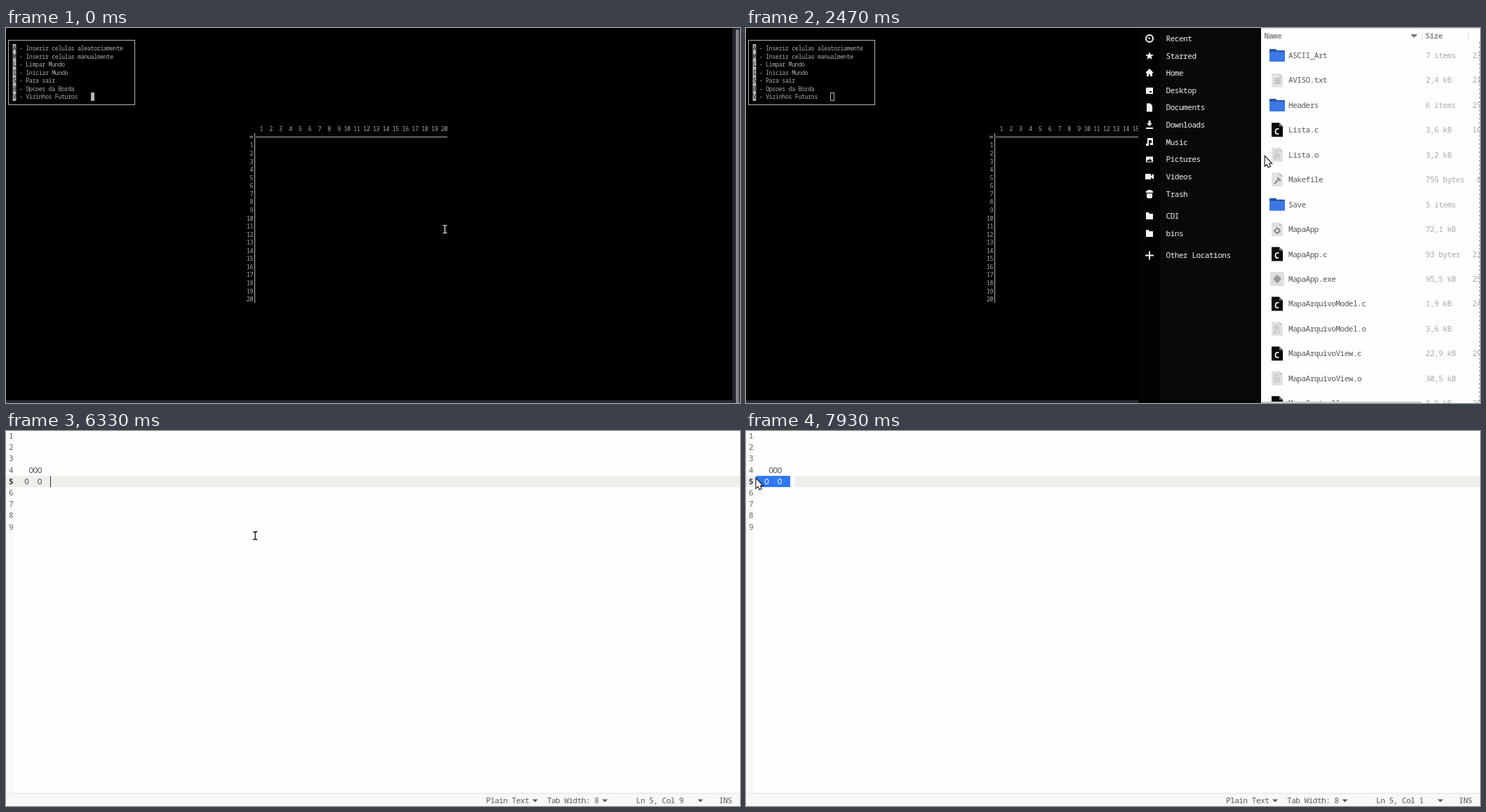
An HTML page with a canvas for the animation above (8 s loop, 1046 by 535 pixels).

```html
<!DOCTYPE html>
<html lang="pt">
<head>
<meta charset="utf-8">
<style>
html, body { margin: 0; width: 100%; height: 100%; overflow: hidden; background: #000; }
canvas { display: block; }
</style>
</head>
<body>
<canvas id="stage" width="1046" height="535"></canvas>
<script>
const ctx = document.getElementById('stage').getContext('2d');
const MONO = '"Noto Sans Mono", "DejaVu Sans Mono", monospace';
const SANS = '"Noto Sans", "Open Sans", sans-serif';
const LOOP = 8000, CELL = 4.617, CHAR = 6.13;

const ramp = (t, a, b) => Math.min(1, Math.max(0, (t - a) / (b - a)));

function rect(x, y, w, h, color, radius = 0) {
  ctx.fillStyle = color;
  ctx.beginPath();
  ctx.roundRect(x, y, w, h, radius);
  ctx.fill();
}
function disc(x, y, r, color) {
  ctx.fillStyle = color;
  ctx.beginPath();
  ctx.arc(x, y, r, 0, 7);
  ctx.fill();
}
function shape(d, x, y, fill, stroke, width = 1) {
  const path = new Path2D(d);
  ctx.save();
  ctx.translate(x, y);
  if (stroke) {
    ctx.strokeStyle = stroke;
    ctx.lineWidth = width;
    ctx.stroke(path);
  }
  if (fill) {
    ctx.fillStyle = fill;
    ctx.fill(path, 'evenodd');
  }
  ctx.restore();
}
// Monospaced text, y is the middle of the capitals
function mono(str, x, y, color, { size = 11, pitch = CHAR, weight = 400, align = 'left' } = {}) {
  ctx.font = `${weight} ${size}px ${MONO}`;
  ctx.letterSpacing = `${pitch - size * 0.6}px`;
  ctx.textAlign = 'left';
  ctx.fillStyle = color;
  ctx.fillText(str, align === 'right' ? x - str.length * pitch : x, y + size * 0.36);
}
function sans(str, x, y, size, color, align = 'left') {
  ctx.font = `${size}px ${SANS}`;
  ctx.letterSpacing = '0px';
  ctx.textAlign = align;
  ctx.fillStyle = color;
  ctx.fillText(str, x, y + size * 0.36);
}

// ---- Terminal ----
const MENU = ['Inserir celulas aleatoriamente', 'Inserir celulas manualmente', 'Limpar Mundo',
  'Iniciar Mundo', 'Para sair', 'Opcoes da Borda', 'Vizinhos Futuros'];
const TERM = { size: 8.3, pitch: CELL };
const TERM_RIGHT = { ...TERM, align: 'right' };

function terminal(t) {
  const gray = '#adadad', row = 11.56;
  rect(0, 0, 1046, 535, '#000');
  rect(0, 531, 1046, 4, '#2a2831');
  rect(1035, 0, 11, 535, '#25252d');
  rect(1040, 2, 4.5, 540, '#85858a', 2);

  ctx.strokeStyle = '#b4b4b4';
  ctx.lineWidth = 1;
  ctx.strokeRect(3.5, 17.5, 180, 92);
  rect(9.6, 23, 4.8, 81, '#b4b4b4');
  MENU.forEach((label, i) => {
    const y = 29 + i * row;
    mono('AMLISBV'[i], 9.8, y, '#111', TERM);
    mono('- ' + label, 19, y, gray, TERM);
  });
  if (t < 200) rect(121, 92, 5, 12, '#b4b4b4');
  else if (t >= 500) ctx.strokeRect(120.5, 92.5, 5, 11);

  for (let n = 1; n <= 20; n++) {
    mono(`${n}`, 366 + (n - 1) * 13.85, 144.5, gray, TERM_RIGHT);
    mono(`${n}`, 352, 167.5 + (n - 1) * row, gray, TERM_RIGHT);
  }
  rect(356, 155, 273, 1, '#b4b4b4');
  rect(354, 150, 1, 242, '#b4b4b4');
  rect(347, 154, 5, 1, '#999');
  rect(347, 156, 5, 1, '#999');
}

// ---- File manager ----
const FOLDER = 'M-5-5H-1L0-3H5V5H-5Z';
const PLACES = [
  [15, 'Recent', 'M-6 0A6 6 0 1 1 6 0A6 6 0 1 1-6 0ZM-4 0A4 4 0 1 1 4 0A4 4 0 1 1-4 0ZM-3-2L1-1V1H0Z'],
  [40, 'Starred', 'M0-6L1.6-2H6L2.5 .8 3.8 5 0 2.5-3.8 5-2.5 .8-6-2H-1.6Z'],
  [64, 'Home', 'M-6 0L0-6 6 0H4V5H1V2H-1V5H-4V0Z'],
  [89, 'Desktop', 'M-5-4H5V5H-5ZM0 1H3V3H0Z'],
  [113.5, 'Documents', 'M-4-6H1L4-3V6H-4Z'],
  [138, 'Downloads', 'M-1.5-6H1.5V-2H4L0 2-4-2H-1.5ZM-5 4H5V6H-5Z'],
  [163, 'Music', 'M-3-6H5V4H1V1H3V-3H-1V5H-5V2H-3Z'],
  [187.5, 'Pictures', 'M-5-4H5V4H-5ZM-4 3H4L1-1-1 1-2 0Z'],
  [212, 'Videos', 'M-6-4H2V-1L6-4V4L2 1V4H-6Z'],
  [237, 'Trash', 'M-5-4L-2-6H2L5-4V-2H-5ZM-4-1H4V4Q4 6 2 6H-2Q-4 6-4 4Z'],
  [268, 'CDI', FOLDER],
  [293, 'bins', FOLDER],
  [324.5, 'Other Locations', 'M-1-6H1V-1H6V1H1V6H-1V1H-6V-1H-1Z'],
];
const parse = list => list.trim().split('\n').map(line => line.split('|'));
const PROJECT = parse(`
ASCII_Art|7 items|23
AVISO.txt|2,4 kB|21
Headers|6 items|25
Lista.c|3,6 kB|16
Lista.o|3,2 kB|
Makefile|755 bytes| 8
Save|5 items|
MapaApp|72,1 kB|
MapaApp.c|93 bytes|22
MapaApp.exe|95,5 kB|25
MapaArquivoModel.c|1,9 kB|24
MapaArquivoModel.o|3,6 kB|
MapaArquivoView.c|22,9 kB|29
MapaArquivoView.o|30,5 kB|
MapaController.c|8,9 kB|25`);
const SAVES = parse(`
PiaoFita.txt|73 bytes|29
Borboleta.txt|73 bytes|29
Bot.dat|600,1 kB|
Meus_Olhos.dat|600,1 kB|29
Teste.txt|73 bytes|30`);

function fileIcon(name, size, y) {
  const ext = name.split('.')[1], x = 757, page = 'M-8-10H3L8-5V10H-8Z', ink = '#aaa';
  if (size.endsWith('items')) {
    rect(746, y - 9, 10, 8, '#2655a8', 1);
    rect(746, y - 7, 22, 5, '#2655a8', 1);
    rect(746, y - 5, 22, 14, '#3c78e6', 1.5);
  } else if (ext === 'c') {
    shape(page, x, y, '#0a0a0a');
    shape('M3-5L8-5 3-10Z', x, y, '#777');
    mono('C', 753, y + 2, '#fff', { size: 12, weight: 700 });
  } else if (ext === 'exe') {
    rect(747, y - 10, 20, 20, '#dedede', 2);
    shape('M0-6L3-3 0 0-3-3ZM0 0L3 3 0 6-3 3ZM-3-3L0 0-3 3-6 0ZM3-3L6 0 3 3 0 0Z', x, y, '#999', '#dedede', 2);
  } else {
    shape(page, x, y, '#e2e2e1');
    shape('M3-10V-5H8Z', x, y, '#c4c4c4');
    if (ext === 'txt') shape('M-4-2H5M-4 1H5M-4 4H5', x, y, null, ink, 1.4);
    else if (ext) ['10', '101', '011'].forEach((bits, i) => mono(bits, 752, y - 4 + i * 4.5, '#999', { size: 4.5, pitch: 3.3 }));
    else if (name === 'Makefile') shape('M-4 6L3-1M0-3L5 2', x, y, null, '#888', 1.8);
    else shape('M-3 2A3 3 0 1 1 3 2A3 3 0 1 1-3 2ZM0-3V-1M0 5V7M-5 2H-3M3 2H5', x, y, null, '#888', 1.8);
  }
}

function files(t, mouse) {
  rect(559, 0, 31, 535, '#030303');
  rect(590, 0, 144, 535, '#090907');
  PLACES.forEach(([y, label, icon]) => {
    if (t >= 2170 && mouse.x < 730 && Math.abs(mouse.y - y) < 12.2) rect(559, y - 12, 175, 24, '#191917');
    shape(icon, 575, y, '#f4f4f4');
    mono(label, 598.6, y, '#f2f2f0');
  });
  rect(734, 0, 312, 535, '#fefefd');
  rect(734, 0, 312, 1, '#d8d8d8');
  mono('Name', 738.5, 11, '#84888a', { weight: 700 });
  mono('Size', 968, 11, '#84888a', { weight: 700 });
  shape('M-5-2H5L0 3Z', 952, 11, '#707578');
  rect(963, 4, 1, 14, '#ddd');
  rect(1029, 4, 1, 14, '#ddd');

  const inSaves = t >= 3090;
  const selected = inSaves ? (t >= 4640 ? 1 : -1) : (t >= 3000 ? 6 : -1);
  (inSaves ? SAVES : PROJECT).forEach(([name, size, date], i) => {
    const y = 39 + i * 35.45, on = i === selected;
    if (on) rect(734, y - 17.5, 312, 35, '#2f78f6');
    fileIcon(name, size, y);
    mono(name, 773, y, on ? '#fff' : '#51585c');
    mono(size, 968.5, y, on ? '#fff' : '#a8aaa9');
    mono(date, 1035, y, on ? '#fff' : '#a8aaa9');
  });
  ctx.setLineDash([3, 3]);
  shape('M0 20V535', 1045.5, 0, null, '#999');
  ctx.setLineDash([]);
  if (t >= 2170) rect(735, 533, 228, 2, '#c9c9c8');
}

// ---- Window switcher ----
function filesThumb(x, y, w, h, split) {
  rect(x, y, w, h, '#fbfbfb');
  rect(x, y, split, h, '#050505');
  rect(x, y, w, 5, '#111');
  for (let i = 0; i < 10; i++) {
    const rowY = y + 11 + i * 8;
    if (rowY > y + h - 3) break;
    rect(x + 4, rowY, 2, 2, '#aaa');
    rect(x + 8, rowY, 9, 1.2, '#777');
    rect(x + split + 3, rowY, 4, 3, i % 3 ? '#bbb' : '#3c78e6');
    rect(x + split + 9, rowY + 1, 12, 1, '#888');
    rect(x + w - 16, rowY + 1, 7, 1, '#ccc');
  }
}
function folderIcon(x, y) {
  rect(x + 3, y, 14, 8, '#3c78e6', 2);
  rect(x + 2, y + 3, 30, 14, '#4f86e8', 2);
  rect(x, y + 9, 34, 22, '#e9ecf2', 3);
  rect(x + 12, y + 15, 10, 3, '#aab4c4', 1);
}

function switcher(alpha) {
  if (alpha <= 0) return;
  ctx.save();
  ctx.globalAlpha = alpha;
  ctx.shadowColor = 'rgba(0,0,0,.5)';
  ctx.shadowBlur = 5;
  ctx.shadowOffsetY = 1;
  rect(100, 167, 842, 153, '#1b1f20', 1);
  ctx.shadowColor = 'transparent';
  rect(228, 177, 112, 112, '#e8727b', 3);

  rect(116, 206, 98, 53, '#040505');
  rect(116, 206, 98, 3, '#2c2f31');
  rect(118, 211, 17, 8, '#1d1d1d');
  rect(149, 221, 1, 24, '#242424');
  rect(149, 221, 26, 1, '#242424');
  rect(179, 249, 34, 28, '#eee', 4);
  rect(181, 251, 30, 24, '#171717', 3);

  filesThumb(244, 186, 79, 93, 29);
  folderIcon(298, 248);

  rect(353, 206, 99, 53, '#fdfdfd');
  rect(353, 206, 99, 3, '#191919');
  rect(357, 213, 4, 1, '#888');
  shape('M0 0H17L26 9V34H0Z', 420, 247, '#f0f0ee');
  shape('M17 0V9H26Z', 420, 247, '#cfcfcd');
  disc(443, 272, 8.5, '#cf1f2e');

  rect(472, 206, 98, 53, '#fbfbfb');
  rect(472, 206, 98, 5, '#dfe1e5');
  rect(476, 214, 30, 1, '#aaa');
  rect(535, 220, 8, 3, '#3a9b57');
  for (let i = 0; i < 6; i++) rect(486, 223 + i * 3.5, 46 - i % 3 * 8, 1, '#c2c6ca');
  sans('Resumo geral', 482, 245, 4, '#333');
  disc(551, 263, 16, '#e2453a');

  filesThumb(593, 195, 94, 75, 22);
  folderIcon(653, 248);

  rect(708, 206, 99, 53, '#ecebf0');
  rect(708, 206, 99, 4, '#4b4a8f');
  rect(708, 210, 6, 49, '#37366b');
  rect(714, 210, 22, 49, '#d9d8e4');
  for (let i = 0; i < 9; i++) {
    rect(717, 213 + i * 5, 15, 1.5, '#77759f');
    rect(742 + i % 2 * 14, 213 + i * 5, 40, 2.5, i % 4 ? '#fff' : '#c7a24c');
  }
  rect(773, 249, 32, 32, '#6264b8', 3);

  rect(828, 222, 98, 19, '#fafafa');
  rect(828, 222, 98, 3, '#181818');
  disc(923, 223.5, 1, '#e65050');
  disc(832, 230, 2, '#2a9d9d');
  sans('The computer needs to restart to finish installing updates.', 836, 230, 3.2, '#222');
  sans('Restart Later', 834, 238, 3, '#555');
  sans('Restart Now', 895, 238, 3, '#555');
  disc(907, 263, 16.5, '#e8efee');
  disc(907, 263, 14.5, '#249f9f');

  sans('Caderno de Mapa', 521, 304, 10.8, '#7c8283', 'center');
  ctx.restore();
}

// ---- Text editor ----
const LINES = ['', '', '', '   OOO', '  O  O', '', '', '', ''];
const lineTop = n => Math.round(16.2 * (n - 1) - 1);
const colX = c => 14 + (c - 1) * 6.125;

function caretAt(t) {
  if (t < 6970) return { line: 5, col: 9 };
  const p = pointer(t - 45);
  const clamp = (v, max) => Math.min(max, Math.max(1, v));
  return { line: clamp(Math.floor((p.y + 1) / 16.2) + 1, 5), col: clamp(Math.round((p.x - 14) / 6.125) + 1, 9) };
}

function editor(t) {
  const { line, col } = caretAt(t);
  const selecting = line < 5 || col < 9;
  rect(0, 0, 1046, 535, '#fefefd');
  rect(0, 0, 12, 517, '#f9f9f8');
  rect(0, lineTop(line), 1046, 16, '#eeeeea');
  if (selecting) {
    if (line < 5) rect(13, lineTop(line), 8, 16, '#fefefd');
    else rect(63, lineTop(5), 7, 16, '#fefefd');
    for (let n = line; n <= 5; n++) {
      const x = n === line ? colX(col) : 14;
      rect(x, lineTop(n), (n === 5 ? 63 : 1044) - x, lineTop(n + 1) - lineTop(n), '#2f78f8');
    }
  }
  LINES.forEach((str, i) => {
    const n = i + 1, y = lineTop(n) + 8.3;
    mono(`${n}`, 4, y, n === line ? '#333' : '#666', { weight: n === line ? 700 : 400 });
    mono(str, 14, y, selecting && n >= line ? '#fff' : '#4c4f50');
  });
  const blinkOn = t < 5530 || (t >= 5930 && t < 6730);
  if (!selecting && blinkOn) rect(63, 64, 1, 16, '#333');

  rect(0, 517, 1046, 18, '#f8f8f7');
  rect(0, 516.5, 1046, 1, '#e0e0de');
  const ink = '#55595a', y = 527.5;
  mono('Plain Text', 684, y, ink);
  mono('Tab Width: 8', 771, y, ink);
  mono(`Ln ${line}, Col ${col}`, 898, y, ink);
  mono('INS', 1016, y, ink);
  for (const x of [754, 853.5, 989.5]) shape('M-4-2H4L0 2Z', x, y, ink);
}

// ---- Mouse ----
const PATH = [
  [0, 624, 286], [2150, 624, 286], [2470, 739, 183], [2700, 768, 226], [2970, 787, 247],
  [3500, 787, 247], [3930, 810, 165], [4090, 810, 165], [4230, 817, 148], [4340, 817, 148],
  [4540, 817.5, 73], [5150, 817.5, 73], [5200, 819, 81], [5650, 819, 81], [5930, 392, 159],
  [6280, 392, 159], [6730, 67, 73], [6940, 67, 73], [7080, 30, 22], [7160, 22, 27],
  [7200, 27, 37], [7400, 31, 55], [7670, 16, 73], [7929, 16, 73], [7930, 14, 68], [8000, 14, 68],
];
function pointer(t) {
  const i = Math.max(1, PATH.findIndex(p => p[0] > t));
  const [t0, x0, y0] = PATH[i - 1], [t1, x1, y1] = PATH[i];
  const k = ramp(t, t0, t1);
  return { x: x0 + (x1 - x0) * k, y: y0 + (y1 - y0) * k };
}
function drawPointer(t, { x, y }) {
  const beam = 'M-3-5.5H-1L0-4.5 1-5.5H3M0-4.5V4.5M-3 5.5H-1L0 4.5 1 5.5H3';
  if (t < 650) shape(beam, 625.5, 287, null, '#eee', 1.2);
  else if (t >= 5200 && t < 7930) {
    shape(beam, x, y, null, '#fff', 3);
    shape(beam, x, y, null, '#111', 1.3);
  } else shape('M.5 .5V13L3.3 10.3 5.4 15 7.6 14 5.6 9.5H9.3Z', x, y, '#fff', '#111', 2.2);
}

function frame() {
  const t = performance.now() % LOOP;
  const mouse = pointer(t);
  const opening = ramp(t, 4970, 5110);
  if (opening < 1) {
    terminal(t);
    if (t >= 1770) files(t, mouse);
    switcher(Math.min(ramp(t, 640, 730), 1 - ramp(t, 1766, 1870)));
  }
  if (opening > 0) {
    const s = 0.9 + 0.1 * opening;
    ctx.save();
    ctx.globalAlpha = opening;
    ctx.translate(523 * (1 - s), 267 * (1 - s));
    ctx.scale(s, s);
    editor(t);
    ctx.restore();
  }
  drawPointer(t, mouse);
  requestAnimationFrame(frame);
}
frame();
</script>
</body>
</html>
```
